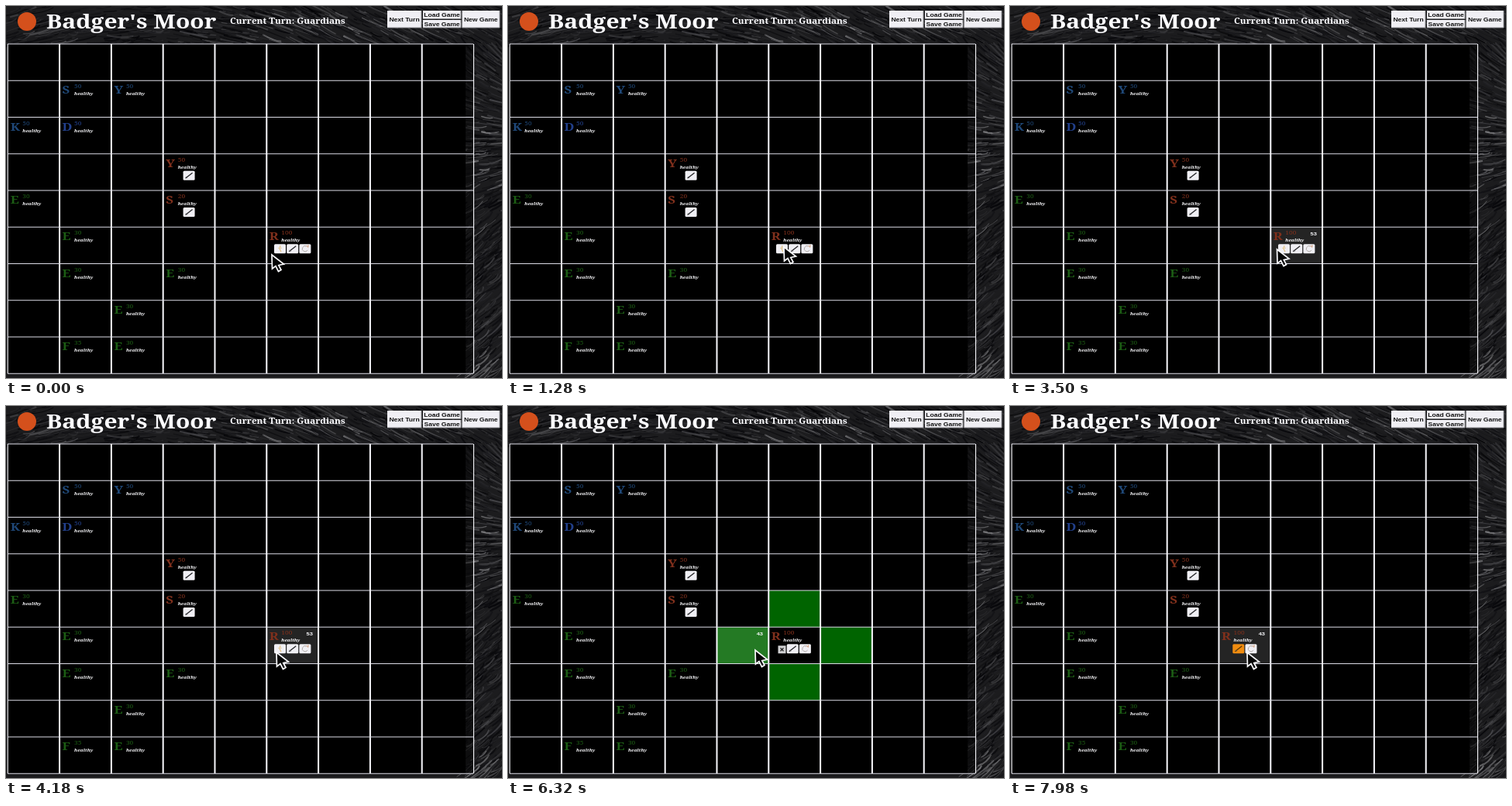
An HTML page with a canvas for the animation above (8000 ms loop, 640 by 480 pixels).

```html
<!DOCTYPE html>
<html lang="en">
<head>
<meta charset="utf-8">
<title>Board game</title>
<style>
html, body { margin: 0; width: 100%; height: 100%; overflow: hidden; background: #000; }
canvas { display: block; width: 640px; height: 480px; }
</style>
</head>
<body>
<canvas id="stage" width="640" height="480"></canvas>
<script>
const ctx = document.getElementById('stage').getContext('2d');
const LOOP = 8000, HOVER_START = 1680, SELECT = 4860, MOVE = 6960;
const WHITE = '#fcfcff', PALE = '#f0eff4';
const SERIF = '"Noto Serif", serif', SANS = '"Liberation Sans", Arial, sans-serif';
const BLUE = '#1f4878', NAVY = '#22408c', GREEN = '#1c5c14', RED = '#80301c';
const COL = 66.8, ROW = 47.25;
const colX = c => 2.3 + c * COL, rowY = r => 49 + r * ROW;

// letter, column, row, health points, colour, icons
const units = [
  ['S', 1, 1, 50, BLUE], ['Y', 2, 1, 50, BLUE], ['K', 0, 2, 50, BLUE], ['D', 1, 2, 50, NAVY],
  ['Y', 3, 3, 50, RED, ['sword']], ['S', 3, 4, 20, RED, ['sword']],
  ['E', 0, 4, 30, GREEN], ['E', 1, 5, 30, GREEN], ['E', 1, 6, 30, GREEN], ['E', 3, 6, 30, GREEN],
  ['E', 2, 7, 30, GREEN], ['F', 1, 8, 35, GREEN], ['E', 2, 8, 30, GREEN]
];

const pointerPath = [
  [0, 343, 321], [1280, 356, 311], [2920, 341, 311], [4180, 349, 318],
  [5340, 356, 315], [6320, 319, 315], [7980, 306, 318], [8000, 306, 318]
];

function box(x, y, w, h, fill, g = ctx) {
  g.fillStyle = fill;
  g.fillRect(x, y, w, h);
}

function line(points, color, width) {
  ctx.beginPath();
  points.forEach(([x, y]) => ctx.lineTo(x, y));
  ctx.strokeStyle = color;
  ctx.lineWidth = width;
  ctx.stroke();
}

function text(str, x, y, font, color, { wide = 1, align = 'left' } = {}) {
  ctx.save();
  ctx.translate(x, y);
  ctx.scale(wide, 1);
  ctx.font = font;
  ctx.fillStyle = color;
  ctx.textAlign = align;
  ctx.fillText(str, 0, 0);
  ctx.restore();
}

function seeded(seed) {
  return () => (seed = seed * 16807 % 2147483647) / 2147483647;
}

function makeRock() {
  const canvas = document.createElement('canvas');
  canvas.width = 640;
  canvas.height = 480;
  const g = canvas.getContext('2d'), rnd = seeded(4127);
  box(0, 0, 640, 480, '#1c1c1e', g);
  const slope = (x, y) => y < 50
    ? -0.45 + Math.min(1, x / 420) * 0.8
    : 0.7 - 1.5 * Math.min(1, (y - 50) / 230);
  // lightest around the right edge, darkest in the middle of the header
  const light = (x, y) => y < 50
    ? 0.35 + 0.3 * Math.cos((x - 440) / 90) + y / 160
    : 0.65 + 0.35 * Math.cos((y - 200) / 50);
  g.lineCap = 'round';
  for (let i = 0; i < 1500; i++) {
    const inHeader = i % 2;
    const x = inHeader ? rnd() * 640 : 585 + rnd() * 60;
    const y = inHeader ? rnd() * 50 : 50 + rnd() * 430;
    const a = slope(x, y) + rnd() * 0.2, len = 10 + rnd() * 26;
    const dx = Math.cos(a) * len / 2, dy = Math.sin(a) * len / 2;
    const grey = rnd() < 0.5 ? rnd() * 20 : 25 + rnd() * 135 * Math.max(0.1, light(x, y));
    g.strokeStyle = `rgb(${grey}, ${grey}, ${grey + 3})`;
    g.globalAlpha = 0.4 + rnd() * 0.4;
    g.lineWidth = 0.5 + rnd() * 1.8;
    g.beginPath();
    g.moveTo(x - dx, y - dy);
    g.quadraticCurveTo(x + rnd() * 4, y + rnd() * 4, x + dx, y + dy);
    g.stroke();
  }
  g.globalAlpha = 1;
  box(593, 49, 10, 425, 'rgba(0,0,0,.5)', g);
  return canvas;
}
const rock = makeRock();

function button(label, x, y, w, h) {
  box(x, y, w, h, PALE);
  line([[x, y + h], [x + w, y + h], [x + w, y]], '#88888c', 1);
  text(label, x + w / 2, y + h / 2 + 2.6, `bold 7px ${SANS}`, '#111', { wide: 1.22, align: 'center' });
}

function header() {
  ctx.fillStyle = '#d4501c';
  ctx.beginPath();
  ctx.arc(27, 20, 12, 0, Math.PI * 2);
  ctx.fill();
  text("Badger's Moor", 52, 29, `bold 25px ${SERIF}`, WHITE, { wide: 1.2 });
  text('Current Turn: Guardians', 289, 23, `bold 10.5px ${SERIF}`, WHITE, { wide: 1.117 });
  button('Next Turn', 492, 6, 44, 22);
  button('Load Game', 538, 6, 49, 10.5);
  button('Save Game', 538, 18, 49, 10);
  button('New Game', 588.5, 6, 48.5, 22);
}

function icon(kind, x, y) {
  if (kind === 'cancel') {
    box(x, y + 2, 10, 10, '#d0d0d2');
    line([[x + 3, y + 5], [x + 7, y + 9]], '#222', 1.3);
    line([[x + 7, y + 5], [x + 3, y + 9]], '#222', 1.3);
    return;
  }
  ctx.beginPath();
  ctx.roundRect(x, y, 15, 12, 1.5);
  ctx.fillStyle = kind === 'ready' ? '#f08c10' : PALE;
  ctx.fill();
  if (kind === 'sword' || kind === 'ready') {
    line([[x + 3, y + 9.5], [x + 12, y + 2.5]], kind === 'ready' ? '#5c3904' : '#232326', 1.3);
    line([[x + 3.5, y + 7.5], [x + 5.5, y + 9.5]], '#5c5c60', 0.8);
  } else if (kind === 'walk') {
    line([[x + 8, y + 2], [x + 7, y + 6], [x + 9, y + 10]], '#e2c48c', 1.3);
    line([[x + 5, y + 5], [x + 10, y + 5]], '#e6d0a4', 1);
  } else {
    ctx.beginPath();
    ctx.arc(x + 7.5, y + 6, 3.6, 0.5, 5.2);
    ctx.strokeStyle = '#b0aaa8';
    ctx.lineWidth = 1;
    ctx.stroke();
    line([[x + 9, y + 2], [x + 11.5, y + 4], [x + 11.5, y + 1]], '#d09a78', 1);
  }
}

function unit([letter, c, r, hp, color, icons = []]) {
  const x = colX(c), y = rowY(r);
  text(letter, x + 3.5, y + 17, `bold 13.5px ${SERIF}`, color, { wide: 1.25 });
  text(hp, x + 19, y + 10, `7px ${SERIF}`, color, { wide: 1.2 });
  text('healthy', x + 19, y + 19, `italic bold 6px ${SERIF}`, WHITE, { wide: 1.05 });
  const sizes = icons.map(kind => kind === 'cancel' ? 10 : 15);
  const total = sizes.reduce((sum, w) => sum + w + 1.2, -1.2);
  let left = x + COL / 2 - total / 2;
  icons.forEach((kind, i) => {
    icon(kind, left, y + 22);
    left += sizes[i] + 1.2;
  });
}

function pointerAt(t) {
  const i = pointerPath.findIndex((key, n) => n > 0 && t <= key[0]);
  const [t0, x0, y0] = pointerPath[i - 1], [t1, x1, y1] = pointerPath[i];
  const p = (t - t0) / (t1 - t0), e = p * p * (3 - 2 * p);
  return [x0 + (x1 - x0) * e, y0 + (y1 - y0) * e];
}

function pointer(x, y) {
  ctx.save();
  ctx.translate(x, y);
  ctx.beginPath();
  [[0, 0], [0.5, 18], [5, 14.5], [8.5, 21.5], [12, 19.5], [8.8, 13.5], [15.5, 12]]
    .forEach(([px, py]) => ctx.lineTo(px, py));
  ctx.closePath();
  ctx.fillStyle = '#050505';
  ctx.fill();
  ctx.strokeStyle = WHITE;
  ctx.lineWidth = 1.7;
  ctx.stroke();
  ctx.restore();
}

function grid() {
  for (let i = 0; i <= 9; i++) {
    line([[2, rowY(i)], [603, rowY(i)]], '#dcdce6', 1.1);
    line([[colX(i), 49], [colX(i), 474]], '#f8f8fc', i === 0 || i === 9 ? 1.1 : 2);
  }
}

function draw(t) {
  const [px, py] = pointerAt(t);
  const selected = t >= SELECT && t < MOVE, moved = t >= MOVE;
  const hoverCol = Math.floor((px - colX(0)) / COL);
  const hovering = t >= HOVER_START;
  const cell = (c, r, fill) => box(colX(c), rowY(r), COL, ROW, fill);

  ctx.drawImage(rock, 0, 0);
  header();
  box(2, 49, 591, 425, '#000');
  if (selected) {
    [[5, 4], [4, 5], [6, 5], [5, 6]].forEach(([c, r]) => cell(c, r, '#006400'));
  }
  if (hovering) cell(hoverCol, 5, 'rgba(255,255,255,.14)');
  grid();
  units.forEach(unit);
  const icons = moved ? ['ready', 'turn'] : [selected ? 'cancel' : 'walk', 'sword', 'turn'];
  unit(['R', moved ? 4 : 5, 5, 100, RED, icons]);
  if (hovering) {
    text(hoverCol === 4 ? '43' : '53', colX(hoverCol) + 59.5, rowY(5) + 10.5,
      `bold 6px ${SANS}`, WHITE, { wide: 1.25, align: 'right' });
  }
  pointer(px, py);
}

const start = performance.now();
function tick() {
  draw((performance.now() - start) % LOOP);
  requestAnimationFrame(tick);
}
tick();
</script>
</body>
</html>
```
